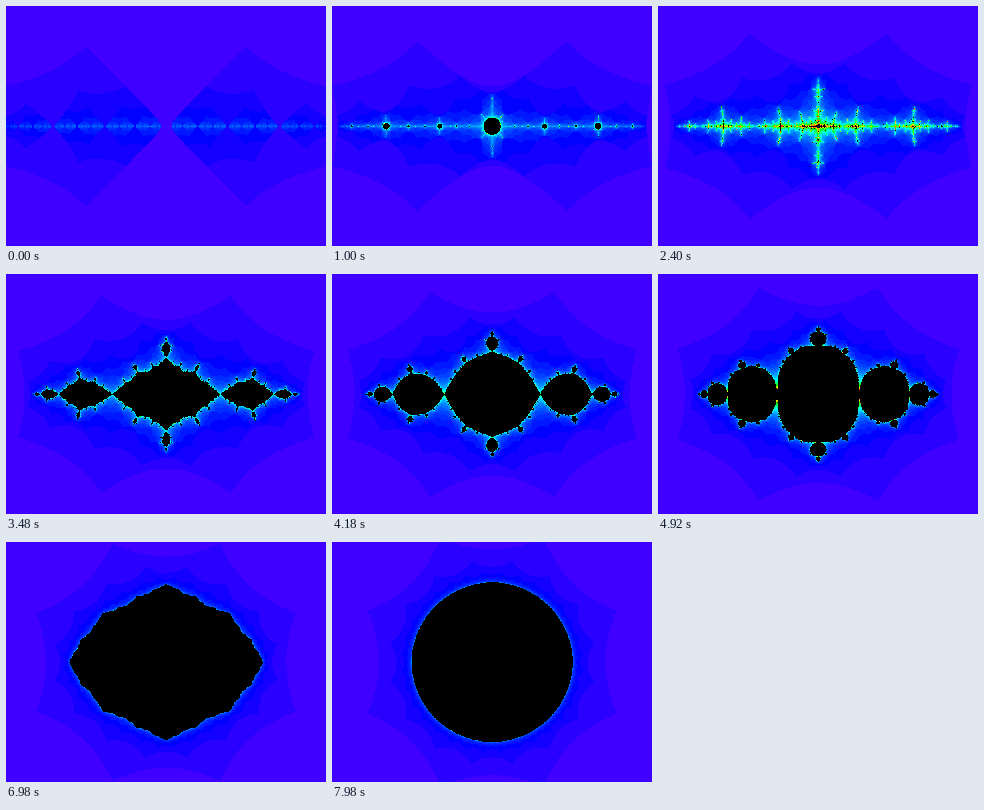
A matplotlib script for the animation above (8000 ms loop, 320x240 px).

```python
import colorsys

import numpy as np
import matplotlib.pyplot as plt
from matplotlib.animation import FuncAnimation

W, H, DPI = 320, 240, 100
FRAMES, INTERVAL = 400, 20
MAX_ITER = 50
C_START, C_STEP = -2.0043, 0.005


def axis_samples(count):
    """Coordinates picked from a grid 2.5 times finer, 200 steps per unit."""
    fine = np.floor((np.arange(count) + 0.5) * 2.5)
    return (fine - count * 1.25) / 200


def make_palette():
    """Violet-blue to red by escape count; the last entry is the black inside."""
    hues = 255 / 360 * (1 - np.arange(MAX_ITER) / MAX_ITER)
    colors = [colorsys.hsv_to_rgb(h, 1, 1) for h in hues] + [(0, 0, 0)]
    return np.round(np.array(colors) * 255).astype(np.uint8)


GX, GY = (g.ravel() for g in np.meshgrid(axis_samples(W), axis_samples(H)))
PALETTE = make_palette()


def julia(c):
    """Escape counts of z*z + c, leaving the square |re|, |im| <= 2."""
    counts = np.full(W * H, MAX_ITER)
    live = np.arange(W * H)
    x, y = GX, GY
    for n in range(MAX_ITER):
        x, y = x * x - y * y + c, 2 * x * y
        inside = (np.abs(x) <= 2) & (np.abs(y) <= 2)
        if not inside.all():
            counts[live[~inside]] = n
            live, x, y = live[inside], x[inside], y[inside]
        if not live.size:
            break
    return counts.reshape(H, W)


def render(i):
    return PALETTE[julia(C_START + C_STEP * i)]


fig = plt.figure(figsize=(W / DPI, H / DPI), dpi=DPI)
ax = fig.add_axes([0, 0, 1, 1])
ax.axis("off")
image = ax.imshow(render(0), interpolation="nearest", aspect="auto")


def update(i):
    image.set_data(render(i))
    return (image,)


anim = FuncAnimation(fig, update, frames=FRAMES, interval=INTERVAL,
                     repeat=True, repeat_delay=0)
plt.show()
```
